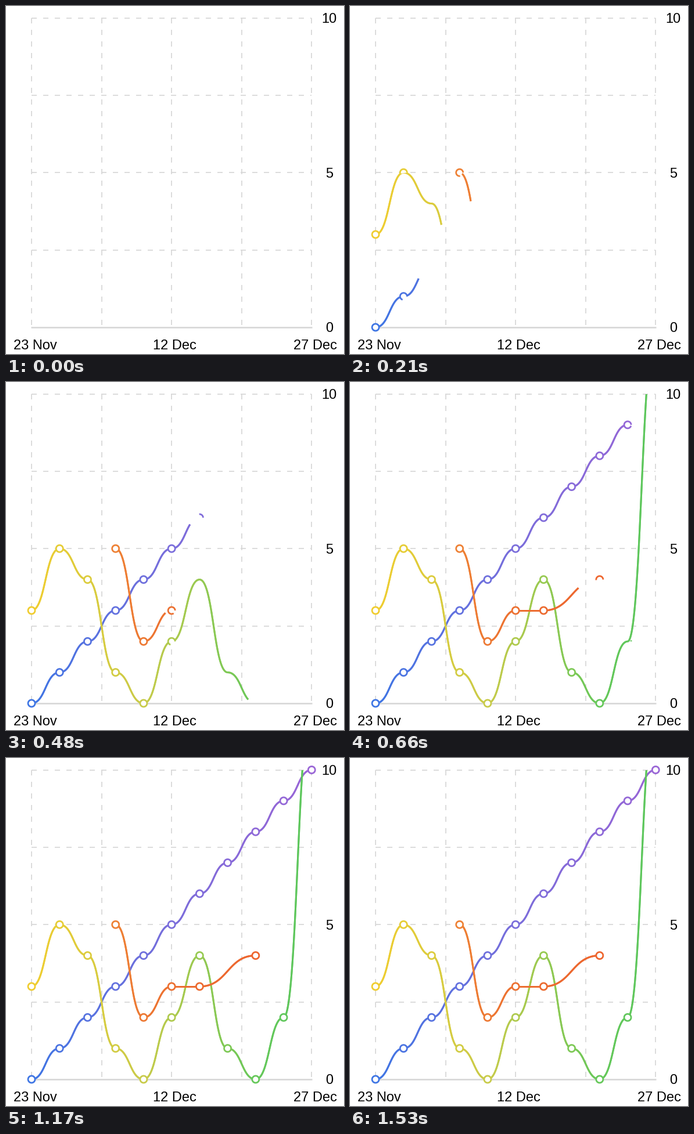
A matplotlib script that plays this animation: 582 by 600 pixels, repeating every 6.53 s.

```python
import numpy as np
import matplotlib.pyplot as plt
from matplotlib.animation import FuncAnimation
from matplotlib.collections import LineCollection, PolyCollection
from matplotlib.colors import LinearSegmentedColormap
from matplotlib.patches import Rectangle

W, H, DPI = 582, 600, 100
LOOP_MS, FRAMES = 6530, 218
INTERVAL = LOOP_MS / FRAMES
PX = 72 / DPI  # points per pixel

LEFT, RIGHT, TOP, BOTTOM = 44, 526.3, 20.5, 554
STEP_X = (RIGHT - LEFT) / 10
STEP_Y = (BOTTOM - TOP) / 10
GRID = "#d7d7d7"
RADIUS = 6

KEY_TIMES = (15, 90, 270, 480, 765)
KEY_VALUES = (0, 0.038, 0.232, 0.571, 1)

fig = plt.figure(figsize=(W / DPI, H / DPI), dpi=DPI, facecolor="white")
ax = fig.add_axes([0, 0, 1, 1])
ax.set_xlim(0, W)
ax.set_ylim(H, 0)
ax.axis("off")


def to_stage(points):
    return np.array([(LEFT + i * STEP_X, BOTTOM - v * STEP_Y) for i, v in points])


def progress_at(t, times=KEY_TIMES, values=KEY_VALUES):
    """Smooth progress through the keys, at rest at both ends."""
    if t <= times[0]:
        return values[0]
    if t >= times[-1]:
        return values[-1]
    slopes = np.gradient(values, times)
    slopes[0] = slopes[-1] = 0
    k = np.searchsorted(times, t, side="right") - 1
    span = times[k + 1] - times[k]
    u = (t - times[k]) / span
    return ((1 + 2 * u) * (1 - u)**2 * values[k] + u * (1 - u)**2 * span * slopes[k]
            + u * u * (3 - 2 * u) * values[k + 1] - u * u * (1 - u) * span * slopes[k + 1])


class Series:
    def __init__(self, points, colors, zorder):
        self.nodes = to_stage(points)
        chords = np.hypot(*np.diff(self.nodes, axis=0).T)
        self.dist = np.concatenate([[0], np.cumsum(chords)])
        self.visible = [n for n in self.nodes if n[1] > TOP - 1]

        self.cmap = LinearSegmentedColormap.from_list("series", colors)
        self.line = LineCollection([], linewidths=3 * PX, capstyle="butt", zorder=zorder)
        self.markers = PolyCollection([], closed=False, facecolors="white",
                                      edgecolors=[self.color(x) for x, _ in self.visible],
                                      linewidths=2.8 * PX, zorder=zorder + 0.5)
        ax.add_collection(self.line, autolim=False)
        ax.add_collection(self.markers, autolim=False)
        self.line.set_clip_path(Rectangle((0, TOP), W, H - TOP, transform=ax.transData))

    def color(self, x):
        x0, x1 = self.nodes[0, 0], self.nodes[-1, 0]
        return self.cmap((x - x0) / (x1 - x0))

    def curve(self, s):
        """Points on cubic curves that are level at every node."""
        k = np.clip(np.searchsorted(self.dist, s, side="right") - 1, 0, len(self.nodes) - 2)
        t = (s - self.dist[k]) / (self.dist[k + 1] - self.dist[k])
        ease = np.column_stack([1.5 * t - 1.5 * t**2 + t**3, 3 * t**2 - 2 * t**3])
        return self.nodes[k] + (self.nodes[k + 1] - self.nodes[k]) * ease

    def draw_line(self, progress):
        end = progress * self.dist[-1]
        xy = self.curve(np.append(np.arange(0, end, 2), end))
        # Overlapping pieces hide the seams between colours.
        pieces = [xy[i:i + 3] for i in range(len(xy) - 1)]
        self.line.set_segments(pieces)
        self.line.set_color([self.color(p[0, 0]) for p in pieces] or "none")

    def draw_markers(self, progress):
        arcs = []
        for i, (x, y) in enumerate(self.visible):
            part = min(progress * len(self.visible) - i, 1)
            if part <= 0:
                break
            a = np.linspace(0, 2 * np.pi * part, 48)
            arcs.append(np.column_stack([x + RADIUS * np.cos(a), y - RADIUS * np.sin(a)]))
        self.markers.set_verts(arcs, closed=False)

    def draw(self, progress):
        self.draw_line(progress)
        self.draw_markers(progress)


def draw_grid():
    width = 1.7
    # Dash lengths are given in multiples of the line width.
    dashed = dict(color=GRID, lw=width * PX, ls=(0, (9 / width, 11 / width)),
                  dash_capstyle="butt", zorder=1)
    for k in range(5):
        x = LEFT + k * (RIGHT - LEFT) / 4
        ax.plot([x, x], [TOP, BOTTOM], **dashed)
        if k < 4:
            y = TOP + k * (BOTTOM - TOP) / 4
            ax.plot([LEFT, RIGHT], [y, y], **dashed)
    ax.plot([LEFT - 1, RIGHT + 1], [BOTTOM, BOTTOM], color=GRID, lw=2.6 * PX,
            solid_capstyle="butt", zorder=1)


def label(x, baseline, text):
    ax.text(x, baseline, text, ha="center", va="baseline", color="black",
            family="Liberation Sans", size=23.6 * PX)


draw_grid()
for x, text in ((50, "23 Nov"), (290.5, "12 Dec"), (532.5, "27 Dec")):
    label(x, 592, text)
for value in (10, 5, 0):
    label(556.5, BOTTOM - value * STEP_Y + 8.5, str(value))

series = [
    Series([(i, i) for i in range(11)],
           ["#3f76e4", "#7b6edb", "#9a66d6"], 2),
    Series(list(enumerate((3, 5, 4, 1, 0, 2, 4, 1, 0, 2, 12))),
           [(0, "#f0cd30"), (0.4, "#c8cb4a"), (0.8, "#66c85a"), (1, "#5cc75e")], 3),
    Series([(3, 5), (4, 2), (5, 3), (6, 3), (8, 4)],
           ["#ee8135", "#ec6c30", "#ee662f"], 4),
]


def update(frame):
    progress = progress_at(frame * INTERVAL)
    for s in series:
        s.draw(progress)
    return [a for s in series for a in (s.line, s.markers)]


anim = FuncAnimation(fig, update, frames=FRAMES, interval=INTERVAL,
                     repeat=True, repeat_delay=0, blit=False)
plt.show()
```
